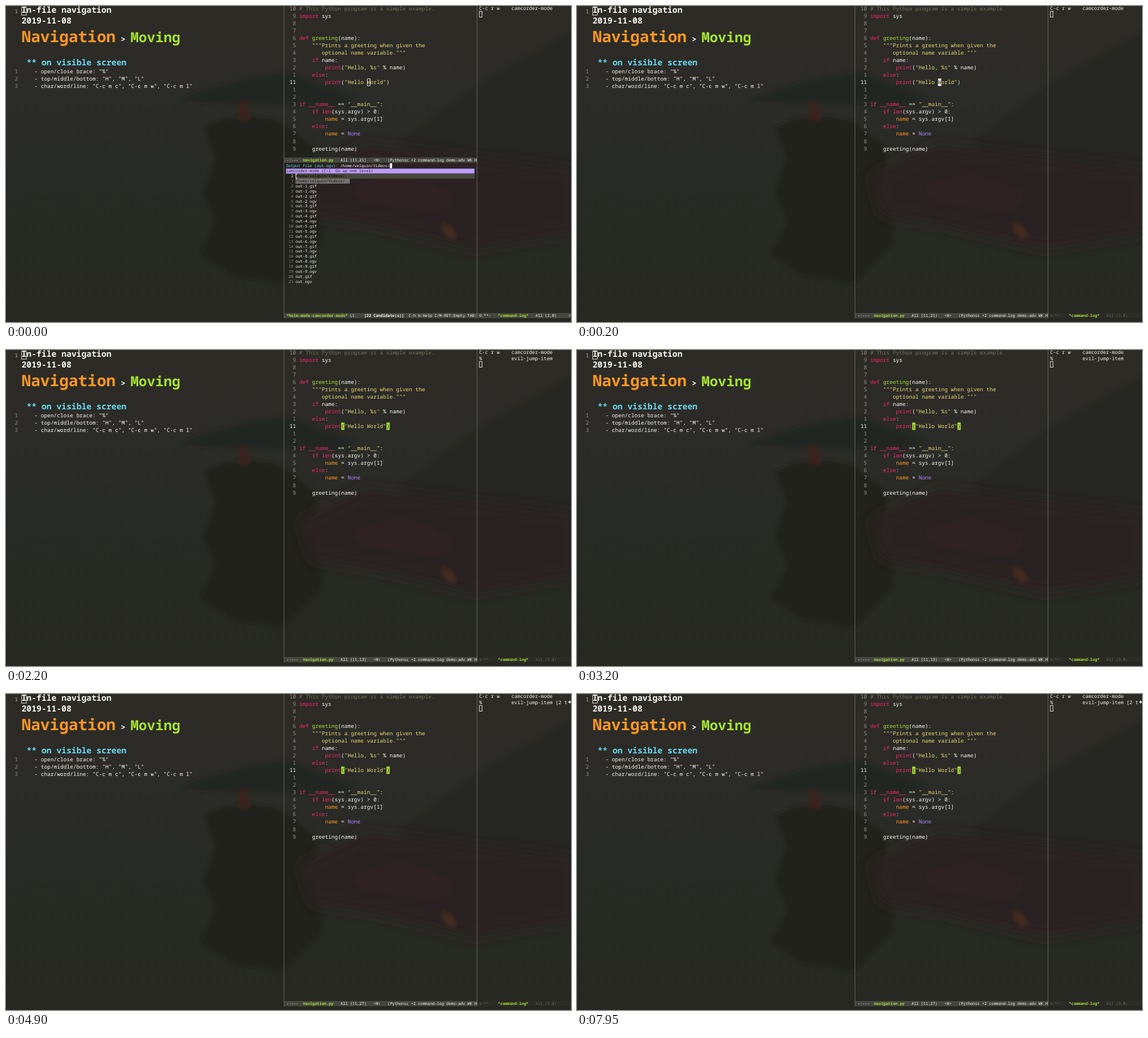
Animation, 1001 px wide and 559 px high, one loop 8000 ms. Source, as an HTML page:

```html
<!DOCTYPE html>
<html lang="en">
<head>
<meta charset="utf-8">
<title>In-file navigation</title>
<style>
  html, body { margin: 0; width: 100%; height: 100%; overflow: hidden; background: #272822; }
  svg { display: block; width: 1001px; height: 559px; }
  text { font-family: "Noto Sans Mono", "DejaVu Sans Mono", monospace; white-space: pre; text-rendering: geometricPrecision; }
</style>
</head>
<body>
<svg id="stage" viewBox="0 0 1001 559" xmlns="http://www.w3.org/2000/svg">
  <defs>
    <linearGradient id="sky" x1="0" y1="0" x2="0" y2="1">
      <stop offset="0" stop-color="#2d2b26"/>
      <stop offset=".3" stop-color="#2b2b27"/>
      <stop offset=".5" stop-color="#282a25"/>
      <stop offset="1" stop-color="#262821"/>
    </linearGradient>
    <filter id="soft" x="-20%" y="-20%" width="140%" height="140%"><feGaussianBlur stdDeviation="3"/></filter>
    <filter id="haze" x="-50%" y="-50%" width="200%" height="200%"><feGaussianBlur stdDeviation="12"/></filter>
    <clipPath id="codeClip"><rect x="492" y="0" width="342.5" height="559"/></clipPath>
  </defs>
  <rect width="1001" height="559" fill="url(#sky)"/>
  <g filter="url(#soft)">
    <path d="M305 168L345 150 400 136 450 124 500 118 560 140 620 160 600 178 480 176Z" fill="#242520"/>
    <path d="M1010 40L930 85 850 130 780 180 700 240 720 270 1010 290Z" fill="#252620"/>
    <path d="M352 215L385 200 440 195 490 205 545 250 560 420 490 490 400 475 345 440 372 380 350 330 372 270Z" fill="#22231d"/>
    <path d="M412 202V178L416 168H424L428 178 432 202Z" fill="#3a241f"/>
  </g>
  <g filter="url(#haze)">
    <path d="M520 300L640 245 800 265 1010 290V400L830 430 660 390 540 370Z" fill="#2b2421"/>
    <path d="M600 320L700 295 800 330 770 365 640 350Z" fill="#2e2321"/>
  </g>
  <path d="M772 382L790 390 801 408 788 413 775 402Z" fill="#42291d" filter="url(#soft)"/>
</svg>
<script>
const NS = "http://www.w3.org/2000/svg";
const stage = document.getElementById("stage");
const WHITE = "#f8f8f2", GREY = "#8f908a", PINK = "#f92672", GREEN = "#a6e22e", YELLOW = "#e6db74",
  ORANGE = "#fd971f", CYAN = "#66d9ef", VIOLET = "#ae81ff", DARK = "#272822", BAR = "#464641", DIM = "#62625b";
const CODE = 9.545, SMALL = 6.95, LOG = 8.68, HEAD = 14.75;

function add(parent, tag, attrs) {
  const el = document.createElementNS(NS, tag);
  for (const k in attrs) el.setAttribute(k, attrs[k]);
  parent.appendChild(el);
  return el;
}
const group = (attrs = {}) => add(stage, "g", attrs);
const rect = (p, x, y, width, height, fill) => add(p, "rect", { x, y, width, height, fill });
const box = (p, x, y, width, height) =>
  add(p, "rect", { x, y, width, height, fill: "none", stroke: WHITE, "stroke-width": .9 });

// parts: a string, or a list of strings and [string, colour, bold] entries
function write(parent, x, y, size, parts, fill = WHITE, extra = {}) {
  const el = add(parent, "text", { x, y, "font-size": size, fill, ...extra });
  for (const part of [].concat(parts.map ? parts : [parts])) {
    const [str, colour, bold] = Array.isArray(part) ? part : [part];
    const span = add(el, "tspan", {});
    if (colour) span.setAttribute("fill", colour);
    if (bold) span.setAttribute("font-weight", 700);
    span.textContent = str;
  }
  return el;
}
const bold = { "font-weight": 700 };
const right = { "text-anchor": "end" };
const show = (el, on) => el.setAttribute("visibility", on ? "visible" : "hidden");

// notes pane
const notes = group();
write(notes, 21.3, 12.6, CODE, "1", "#b0b0a8", right);
write(notes, 27.5, 12.3, HEAD, "In-file navigation", WHITE, bold);
box(notes, 27.8, 1.8, 8.2, 14.4);
write(notes, 27.5, 31.4, HEAD, "2019-11-08", WHITE, bold);
write(notes, 27.5, 63.8, 27.8, "Navigation", ORANGE, bold);
write(notes, 203.3, 63.8, HEAD, ">", WHITE, bold);
write(notes, 220.4, 63.8, 24.5, "Moving", GREEN, bold);
write(notes, 36.4, 105, HEAD, "** on visible screen", CYAN, bold);
['- open/close brace: "%"', '- top/middle/bottom: "H", "M", "L"', '- char/word/line: "C-c m c", "C-c m w", "C-c m l"']
  .forEach((line, i) => {
    const y = 118.8 + 13.04 * i;
    write(notes, 21.3, y, CODE, String(i + 1), GREY, right);
    write(notes, 50.3, y, CODE, line);
  });

// code pane
const code = group({ "clip-path": "url(#codeClip)" });
const X0 = 519.4, CW = CODE * .6, ROW = 13.04, Y0 = 7.8;
const codeLines = [
  [["# This Python program is a simple example.", "#75715e"]],
  [["import", PINK], " sys"],
  [], [],
  [["def ", PINK], ["greeting", GREEN], "(name):"],
  [['    """Prints a greeting when given the', YELLOW]],
  [['       optional name variable."""', YELLOW]],
  [["    if", PINK], " name:"],
  [["        print", PINK], "(", ['"Hello, %s"', YELLOW], " % name)"],
  [["    else", PINK], ":"],
  [["        print", PINK], "(", ['"Hello World"', YELLOW], ")"],
  [], [],
  [["if __name__", PINK], " == ", ['"__main__"', YELLOW], ":"],
  [["    if len", PINK], "(sys.argv) > 0:"],
  [["        name", ORANGE], " = sys.argv[1]"],
  [["    else", PINK], ":"],
  [["        name", ORANGE], " = ", ["None", VIOLET]],
  [],
  ["    greeting(name)"]
];
codeLines.forEach((parts, i) => {
  const y = Y0 + ROW * i, here = i === 10;
  write(code, 513.6, y, CODE, String(here ? 11 : Math.abs(i - 10)), here ? WHITE : GREY, right);
  if (parts.length) write(code, X0, y, CODE, parts);
});

// one highlighted character cell on the current line
function cell(col, ch) {
  const g = group(), x = X0 + CW * col;
  const back = rect(g, x, 128.3, CW, 13.1, WHITE);
  write(g, x, Y0 + ROW * 10, CODE, ch, DARK);
  return { paint(fill) { show(g, fill); if (fill) back.setAttribute("fill", fill); } };
}
const wordCell = cell(21, "W"), openCell = cell(13, "("), closeCell = cell(27, ")");
const idleCursor = group();
box(idleCursor, X0 + CW * 21 + .4, 128.8, CW - .6, 12.2);

// mode line of the code pane
const codeBar = group({ "clip-path": "url(#codeClip)" });
rect(codeBar, 492, 543, 342.5, 9.2, BAR);
const codeBarText = write(codeBar, 497, 549.8, SMALL, ["-:---  ", ["navigation.py", GREEN, 1], "",
  "   <N>   (Pythonsc +2 command-log demo-adv WK H"]);
const codePos = codeBarText.children[2];

// command log pane
const log = group();
const logX = 838.3;
write(log, logX, 6.6, LOG, "C-c r w    camcorder-mode");
const logJump = write(log, logX, 17.5, LOG, ["%          evil-jump-item", ""]);
const logCount = logJump.children[1];
const logMore = add(log, "path", { d: "M996 13.5H998V10.8L1001 14.2 998 17.6V15H996Z", fill: WHITE });
const logCursor = box(log, 838.7, 9.4, 4.6, 10.2);

const logBar = group();
const logBarBack = rect(logBar, 835, 543, 166, 9.2, BAR);
const logBarText = write(logBar, logX, 549.8, SMALL, ["U:**-   ", ["*command-log*", GREEN, 1], "", "     <"]);
const logPos = logBarText.children[2], logTail = logBarText.children[3];

// file prompt with candidates
const prompt = group({ "clip-path": "url(#codeClip)" });
const home = "/home/velquin/Videos/";
const px = 496.4, lx = 513, pitch = 8.89;
write(prompt, px, 284.8, SMALL, [["Output file (out.ogv): ", CYAN], home]);
rect(prompt, 679.9, 278.2, 4.2, 8.8, WHITE);
rect(prompt, 496, 287.7, 334, 8.7, "#bb9cfb");
write(prompt, px, 294.4, SMALL, "camcorder-mode (C-l: Go up one level)", DARK);
rect(prompt, lx, 296.4, 317, 8.9, "#49483e");
rect(prompt, lx, 305.3, 96, 8.9, "#75756f");
for (let i = 0; i < 22; i++) {
  const y = 303.1 + pitch * i, n = i >> 1, ext = i % 2 ? ".ogv" : ".gif";
  write(prompt, 509.2, y, SMALL, String(i || 2), i ? GREY : WHITE, right);
  const name = i < 2 ? home + (i ? ".." : ".") : (i < 20 ? "out-" + n : "out") + ext;
  write(prompt, lx, y, SMALL, name, i < 2 ? "#161712" : WHITE, i ? {} : bold);
}
add(prompt, "path", { d: "M516 297H513.6V304.8H516", fill: "none", stroke: WHITE });
rect(prompt, 492, 543, 342.5, 9.2, BAR);
write(prompt, 497, 549.8, SMALL, [["*helm-mode-camcorder-mode*", GREEN, 1], " L1    ",
  ["[22 Candidate(s)]", WHITE, 1], "  C-h m:Help C/M-RET:Empty TAB:"]);

for (const x of [492, 834]) rect(stage, x, 0, 1, 552, "#64645e");

const blinks = [700, 1150, 1650, 1700, 2200, 2700, 3200, 3700, 4200, 4400, 4900, 5400, 5900, 6400, 6900, 7400, 7850];

function draw(t) {
  const asking = t < 200, jumps = t < 1700 ? 0 : t < 4400 ? 1 : 2;
  const lit = blinks.filter(b => b <= t).length % 2 === 0;

  show(prompt, asking);
  show(idleCursor, asking);
  codeBar.setAttribute("transform", `translate(0 ${asking ? -275 : 0})`);
  codePos.textContent = `   All (11,${[21, 13, 27][jumps]})`;

  wordCell.paint(!asking && !jumps && lit && WHITE);
  openCell.paint(jumps && (jumps === 1 && lit ? WHITE : GREEN));
  closeCell.paint(jumps && (jumps === 2 && lit ? WHITE : GREEN));

  show(logJump, jumps);
  show(logMore, jumps === 2);
  logCount.textContent = jumps === 2 ? " [2 t" : "";
  logCursor.setAttribute("y", jumps ? 20.3 : 9.4);
  logBarBack.setAttribute("fill", asking ? BAR : "#2c2c27");
  logBarText.setAttribute("fill", asking ? WHITE : DIM);
  logPos.textContent = `   All (${jumps ? 3 : 2},0)`;
  logTail.textContent = asking ? "     <" : "";
}

const start = performance.now();
function tick() {
  draw((performance.now() - start) % 8000);
  requestAnimationFrame(tick);
}
draw(0);
requestAnimationFrame(tick);
</script>
</body>
</html>
```
